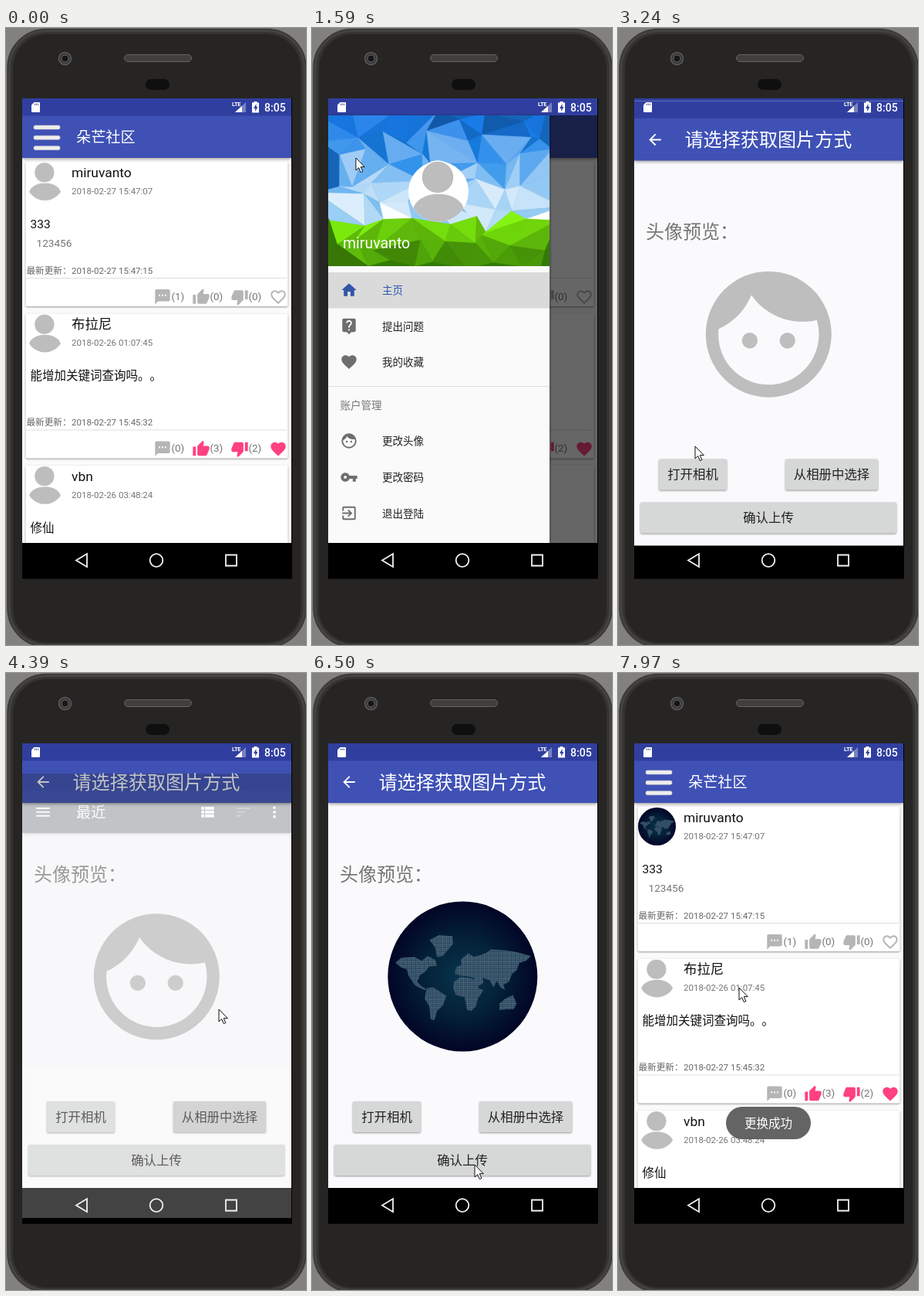
An HTML page for the animation above (8 s loop, 389 by 798 pixels).

```html
<!DOCTYPE html>
<html lang="zh-CN">
<head>
<meta charset="utf-8">
<title>社区</title>
<style>
  html, body { margin: 0; width: 100%; height: 100%; overflow: hidden; background: #83817e }
  svg { display: block; width: 389px; height: 798px; font-family: Roboto, "Noto Sans CJK SC", "Noto Sans CJK", sans-serif }
  text { white-space: pre; text-spacing-trim: space-all; font-feature-settings: "chws" 0, "halt" 0 }
  .card { filter: drop-shadow(0 1px 1px #0006) }
  .bar { filter: drop-shadow(0 1px 2px #0007) }
</style>
</head>
<body>
<svg viewBox="0 0 389 798">
  <defs>
    <path id="home" d="M10 20v-6h4v6h5v-8h3L12 3 2 12h3v8z"/>
    <path id="help" d="M19 2H5c-1.1 0-2 .9-2 2v14c0 1.1.9 2 2 2h4l3 3 3-3h4c1.1 0 2-.9 2-2V4c0-1.1-.9-2-2-2zm-6 16h-2v-2h2v2zm2.07-7.75l-.9.92C13.45 11.9 13 12.5 13 14h-2v-.5c0-1.1.45-2.1 1.17-2.83l1.24-1.26c.37-.36.59-.86.59-1.41 0-1.1-.9-2-2-2s-2 .9-2 2H8c0-2.21 1.79-4 4-4s4 1.79 4 4c0 .88-.36 1.68-.93 2.25z"/>
    <path id="heart" d="M12 21.35l-1.45-1.32C5.4 15.36 2 12.28 2 8.5 2 5.42 4.42 3 7.5 3c1.74 0 3.41.81 4.5 2.09C13.09 3.81 14.76 3 16.5 3 19.58 3 22 5.42 22 8.5c0 3.78-3.4 6.86-8.55 11.54z"/>
    <path id="heartLine" d="M16.5 3c-1.74 0-3.41.81-4.5 2.09C10.91 3.81 9.24 3 7.5 3 4.42 3 2 5.42 2 8.5c0 3.78 3.4 6.86 8.55 11.54L12 21.35l1.45-1.32C18.6 15.36 22 12.28 22 8.5 22 5.42 19.58 3 16.5 3zm-4.4 15.55l-.1.1-.1-.1C7.14 14.24 4 11.39 4 8.5 4 6.5 5.5 5 7.5 5c1.54 0 3.04.99 3.57 2.36h1.87C13.46 5.99 14.96 5 16.5 5c2 0 3.5 1.5 3.5 3.5 0 2.89-3.14 5.74-7.9 10.05z"/>
    <g id="face">
      <circle cx="9" cy="13" r="1.25"/><circle cx="15" cy="13" r="1.25"/>
      <path d="M12 2a10 10 0 1 0 0 20a10 10 0 1 0 0-20zm0 18c-4.41 0-8-3.59-8-8 0-.29.02-.58.05-.86 2.36-1.05 4.23-2.98 5.21-5.37C11.07 8.33 14.05 10 17.42 10c.78 0 1.53-.09 2.25-.26.21.71.33 1.47.33 2.26 0 4.41-3.59 8-8 8z"/>
    </g>
    <path id="key" d="M12.65 10C11.83 7.67 9.61 6 7 6c-3.31 0-6 2.69-6 6s2.69 6 6 6c2.61 0 4.83-1.67 5.65-4H17v4h4v-4h2v-4zM7 14c-1.1 0-2-.9-2-2s.9-2 2-2 2 .9 2 2-.9 2-2 2z"/>
    <path id="exit" d="M10.09 15.59L11.5 17l5-5-5-5-1.41 1.41L12.67 11H3v2h9.67zM19 3H5c-1.11 0-2 .9-2 2v4h2V5h14v14H5v-4H3v4c0 1.1.89 2 2 2h14c1.1 0 2-.9 2-2V5c0-1.1-.9-2-2-2z"/>
    <path id="chat" d="M20 2H4c-1.1 0-1.99.9-1.99 2L2 22l4-4h14c1.1 0 2-.9 2-2V4c0-1.1-.9-2-2-2zM9 11H7V9h2v2zm4 0h-2V9h2v2zm4 0h-2V9h2v2z"/>
    <path id="up" d="M1 21h4V9H1v12zm22-11c0-1.1-.9-2-2-2h-6.31l.95-4.57.03-.32c0-.41-.17-.79-.44-1.06L14.17 1 7.59 7.59C7.22 7.95 7 8.45 7 9v10c0 1.1.9 2 2 2h9c.83 0 1.54-.5 1.84-1.22l3.02-7.05c.09-.23.14-.47.14-.73z"/>
    <use id="down" href="#up" transform="rotate(180 12 12)"/>
    <path id="back" d="M20 11H7.83l5.59-5.59L12 4l-8 8 8 8 1.41-1.41L7.83 13H20z"/>
    <path id="menu" d="M3 18h18v-2H3zm0-5h18v-2H3zm0-7v2h18V6z"/>
    <path id="rows" d="M4 14h4v-4H4zm0 5h4v-4H4zM4 9h4V5H4zm5 5h12v-4H9zm0 5h12v-4H9zM9 5v4h12V5z"/>
    <path id="sort" d="M3 18h6v-2H3zM3 6v2h18V6zm0 7h12v-2H3z"/>
    <g id="more"><circle cx="12" cy="6" r="2"/><circle cx="12" cy="12" r="2"/><circle cx="12" cy="18" r="2"/></g>
    <path id="image" d="M21 19V5c0-1.1-.9-2-2-2H5c-1.1 0-2 .9-2 2v14c0 1.1.9 2 2 2h14c1.1 0 2-.9 2-2zM8.500 13.500l2.500 3.010L14.500 12l4.500 6H5z"/>
    <clipPath id="round"><circle r="39"/></clipPath>
    <g id="person" fill="#bdbdbd">
      <circle r="39" fill="#fff"/>
      <ellipse cy="25" rx="33" ry="22" clip-path="url(#round)"/>
      <circle cx="-1" cy="-18.5" r="21" stroke="#fff" stroke-width="1.5"/>
    </g>
    <radialGradient id="sea"><stop stop-color="#07344c"/><stop offset=".5" stop-color="#042239"/><stop offset="1" stop-color="#020526"/></radialGradient>
    <pattern id="dots" width="2" height="2" patternUnits="userSpaceOnUse"><rect width="2" height="2" fill="#1d3b52"/><circle cx="1" cy="1" r=".7" fill="#6b8495"/></pattern>
    <path id="land" fill="url(#dots)" d="M207 246l6-5 14-1 8 4 6-5 8 4 2 6-8 1-5 6-5 3-3 7 5 5 5 3-2 1-10-5-7-10-2-7-6-2zM243 222l10-5 14 1 1 8-11 13-6 1-2-10zM240 273l7-1 14 9-4 10-6 6-3 10-4-2-1-13-5-8zM269 266l7-5 8 1 8 2 3 9 5 2-6 9-2 8-5 5-4-1-3-14-9-2-3-7zM270 258l1-7 6-3-1-5 8-7 6 4 12-4 6-4 16 1 12 2 14 4-5 5-7 2-3 8-5 4-3 8-6 3 2 6-5-3-4-7-3 7-5-8-7-2 1 5-6 4-4-9-9-2-6-1zM317 289l6-5 8-4 4 9-3 6-8 0-7 1z"/>
    <clipPath id="screen"><rect x="21" y="91" width="349" height="621"/></clipPath>
    <clipPath id="window"><rect x="21" y="91" width="349" height="575"/></clipPath>
    <clipPath id="header"><rect x="21" y="113" width="287" height="195"/></clipPath>
  </defs>

  <rect width="389" height="798" fill="#83817e"/>
  <rect x="2" y="1.500" width="387" height="799" rx="50" fill="#44423f" stroke="#3a3836" stroke-width="1.500"/>
  <rect x="5" y="4.500" width="381" height="793" rx="47" fill="#353330" stroke="#484643"/>
  <rect x="9" y="8" width="373" height="787" rx="44" fill="#262523"/>
  <circle cx="76.500" cy="39.500" r="8" fill="#3a3938" stroke="#5c5b59" stroke-width="1.500"/>
  <circle cx="76.500" cy="39.500" r="4.500" fill="#15161a" stroke="#6b6b6b"/>
  <rect x="153.500" y="34.500" width="87" height="9" rx="4.500" fill="#403f3d" stroke="#656360"/>
  <rect x="181" y="66" width="31" height="14" rx="7" fill="#0f0f10"/>
  <rect x="21" y="91" width="350" height="621.500"/>

  <g clip-path="url(#screen)">
    <g id="list" clip-path="url(#window)"></g>
    <g id="upload"></g>
    <g id="picker"></g>
    <g fill="#fff">
      <path d="M36.500 96H43a1 1 0 0 1 1 1V108a1 1 0 0 1-1 1H34a1 1 0 0 1-1-1V99.500z"/>
      <path d="M37.500 97.500v2.500m2-2.500v2.500m2-2.500v2.500" stroke="#555f9f"/>
      <path d="M311 96V109H297z" opacity=".35"/>
      <path d="M306 100.700V109H297z"/>
      <text x="293" y="101" font-size="7.500" font-weight="700" letter-spacing="-.4">LTE</text>
      <path d="M321.500 95h4v1.500h2.500V109.500h-9V96.500h2.500z"/>
      <path d="M324.500 98l-3.500 6h2.200v4l3.300-6h-2z" fill="#303f9f"/>
      <text x="335" y="107.700" font-size="14" font-weight="500">8:05</text>
    </g>
    <g fill="none" stroke="#f2f2f2" stroke-width="1.800">
      <path d="M91 688.500l14-8.500v17zM285 681.500h14v14h-14z"/><circle cx="195" cy="688.500" r="8.300"/>
    </g>
  </g>
  <path id="cursor" d="M0 0V16l3.700-3.400 2.600 6 2.600-1.100-2.600-5.900H11.300z" fill="#fff" stroke="#111"/>
</svg>
<script>
const $ = id => document.getElementById(id);
const text = (x, y, size, fill, s, more = '') => `<text x="${x}" y="${y}" font-size="${size}" fill="${fill}" ${more}>${s}</text>`;
const rect = (x, y, w, h, fill, more = '') => `<rect x="${x}" y="${y}" width="${w}" height="${h}" fill="${fill}" ${more}/>`;
const icon = (id, x, y, fill, k = .97) => `<use href="#${id}" fill="${fill}" transform="translate(${x} ${y}) scale(${k}) translate(-12 -12)"/>`;
const person = (x, y, r) => `<use href="#person" transform="translate(${x} ${y}) scale(${r / 39})"/>`;
const world = (x, y, r, corner) => `<g transform="translate(${x} ${y}) scale(${r / 79}) translate(-278 -260.5)">
  ${rect(199, 181.5, 158, 158, 'url(#sea)', `rx="${corner}"`)}<use href="#land"/></g>`;
const page = (bg, status, bar) => rect(21, 91, 349, 575, bg) + rect(21, 113, 349, 55, bar, 'class="bar"') + rect(21, 91, 349, 22.5, status);

const GREY = '#757575', PALE = '#b5b5b5', PINK = '#ff4081', USER = 'miruvanto';

function post(i, name, made, title, note, updated, counts, liked) {
  const tint = liked ? PINK : PALE;
  return `<g transform="translate(0 ${i * 196.4})">
    ${rect(25.5, 173, 340, 187, '#fff', 'rx="2.5" class="card"')}${person(50.5, 198.5, 24.5)}
    ${text(85, 193, 17.4, '#111', name)}${text(85, 215, 11.5, GREY, made)}
    ${text(31.5, 259, 15.5, '#111', title)}${text(39.5, 283, 13.6, GREY, note)}
    ${text(26.5, 318, 11.6, '#666', '最新更新：')}${text(85, 318, 11.5, '#666', updated)}
    ${rect(26, 323, 338, 1, '#dedede')}
    ${icon('chat', 203, 347.7, PALE)}${icon('up', 253, 348, tint)}${icon('down', 303, 348, tint)}
    ${icon(liked ? 'heart' : 'heartLine', 353, 348, tint)}
    ${counts.map((n, k) => text(214.5 + 50 * k, 351.5, 13.4, GREY, `(${n})`)).join('')}</g>`;
}

// Low-poly landscape: a jittered grid of triangles, sky paling downwards, hills darkening.
function landscape() {
  let seed = 11, out = '';
  const random = () => (seed = seed * 16807 % 2147483647) / 2147483647;
  const cols = 8, rows = 7, points = [];
  for (let j = 0; j <= rows; j++) for (let i = 0; i <= cols; i++)
    points.push([(i + (random() - .5) * .9) / cols, (j + (random() - .5) * .9) / rows]);
  const triangle = (...corners) => {
    const [u, v] = [0, 1].map(n => (corners[0][n] + corners[1][n] + corners[2][n]) / 3), n = random();
    const color = v < .68 ? `hsl(${202 + (1 - v) * 10} 82% ${34 + v * 62 + n * 26 - u * (.5 - v) * 18}%)`
      : `hsl(${78 + v * 16} 90% ${92 - v * 72 + n * 12}%)`;
    const outline = corners.map(([x, y]) => `${(21 + x * 287).toFixed(1)} ${(113 + y * 195).toFixed(1)}`).join('L');
    out += `<path d="M${outline}z" fill="${color}" stroke="${color}" stroke-width=".6"/>`;
  };
  for (let j = 0; j < rows; j++) for (let i = 0; i < cols; i++) {
    const k = j * (cols + 1) + i, [a, b, c, d] = [k, k + 1, k + cols + 1, k + cols + 2].map(n => points[n]);
    if (random() < .5) { triangle(a, b, c); triangle(b, c, d); } else { triangle(a, b, d); triangle(a, c, d); }
  }
  return `<g clip-path="url(#header)">${rect(21, 113, 287, 98, '#1565b8')}${rect(21, 211, 287, 97, '#357a08')}${out}</g>`;
}

const menuRow = (y, id, label, fill = '#6e6e6e', ink = '#222') => icon(id, 48, y, fill) + text(91, y + 5, 13.5, ink, label);

$('list').innerHTML = page('#fafafa', '#303f9f', '#3f51b5')
  + [126, 139.3, 152.7].map(y => rect(36, y, 34, 5, '#eee', 'rx="2" stroke="#c9c9c9" stroke-width=".6"')).join('')
  + text(91, 148.3, 19.2, '#fff', '朵芒社区')
  + post(0, USER, '2018-02-27 15:47:07', '333', '123456', '2018-02-27 15:47:15', [1, 0, 0])
  + post(1, '布拉尼', '2018-02-26 01:07:45', '能增加关键词查询吗。。', '', '2018-02-27 15:45:32', [0, 3, 2], true)
  + post(2, 'vbn', '2018-02-26 03:48:24', '修仙', '', '', [0, 0, 0])
  + `<g id="newAvatar">${world(50.5, 198.5, 24.5, 79)}</g>`
  + rect(21, 113, 349, 553, '#000', 'id="scrim"')
  + `<g id="drawer">${rect(21, 113, 287, 553, '#fafafa', 'class="bar"')}${landscape()}
    ${person(164, 211.5, 39)}${text(40, 285, 19.5, '#fff', USER)}
    ${rect(21, 316, 287, 46.5, '#dadada')}${menuRow(339, 'home', '主页', '#3355a8', '#2c57b0')}
    ${menuRow(385.5, 'help', '提出问题')}${menuRow(432, 'heart', '我的收藏')}
    ${rect(21, 463, 287, 1, '#dedede')}${text(36.5, 493, 13.5, GREY, '账户管理')}
    ${menuRow(534, 'face', '更改头像')}${menuRow(581, 'key', '更改密码')}${menuRow(627.5, 'exit', '退出登陆')}</g>`
  + `<g id="toast">${rect(140, 561, 110, 42, '#5c5c5c', 'rx="21" opacity=".95"')}${text(195, 587.5, 15.5, '#fff', '更换成功', 'text-anchor="middle"')}</g>`;

const button = (id, x, y, w, label) => rect(x, y, w, 40, '#d6d7d7', `id="${id}" rx="2" class="card"`)
  + text(x + w / 2, y + 26, 16.4, '#222', label, 'text-anchor="middle"');

$('upload').innerHTML = page('#fafafc', '#303f9f', '#3f51b5')
  + icon('back', 48, 141, '#fff') + text(86.5, 149.5, 24.1, '#fff', '请选择获取图片方式')
  + text(36, 269, 24, GREY, '头像预览：')
  + `<g id="blank">${icon('face', 195.3, 392.7, '#bebebe', 8.15)}</g><g id="chosen">${world(195.3, 392.5, 97, 79)}</g>`
  + button('camera', 53, 554, 88, '打开相机') + button('album', 217, 554, 120, '从相册中选择') + button('confirm', 29, 610, 332, '确认上传');

const eye = (x, y) => `<circle cx="${x}" cy="${y}" r="9" fill="#8f6430" stroke="#5b4127"/><circle cx="${x}" cy="${y}" r="5.5" fill="#15110e"/>`;
const cat = `<svg x="34" y="182" width="157.5" height="157" viewBox="34 182 157.5 157">${rect(34, 182, 158, 157, '#bcb3a2')}
  <path d="M34 270L84 339H34z" fill="#957c4c"/><path d="M124 339L192 280V339z" fill="#ddd0b0"/>
  <path d="M64 276L130 290 112 339H76z" fill="#1b2030"/>
  <path d="M130 184Q176 178 190 196V284Q160 306 132 339H114Q118 306 100 286z" fill="#dcd6cf"/>
  <ellipse cx="95" cy="238" rx="62" ry="54" fill="#e9e3dc"/>
  <path d="M38 182H76Q66 202 38 214zM98 182H156Q152 200 134 200Q116 200 98 182z" fill="#d3a35c"/>
  ${eye(68, 222)}${eye(114, 232)}<path d="M80 234l10 2-6 6z" fill="#cf9c90"/><path d="M70 250Q82 240 100 258" fill="none" stroke="#a08a7e" stroke-width="1.5"/></svg>`;
const file = (x, thumb, name, date) => rect(x, 181.5, 157.5, 210, '#fbfbfb', 'class="card"') + thumb
  + icon('image', x + 26.5, 365, '#db4437') + text(x + 48.7, 364, 15.6, '#444', name) + text(x + 48.7, 381, 11.6, '#7a7a7a', date);

$('picker').innerHTML = page('#f6f6f6', '#20282d', '#2a333a')
  + icon('menu', 48, 141, '#fff') + text(91, 148.3, 19.2, '#fff', '最近')
  + icon('rows', 261, 141, '#fff') + icon('sort', 308, 141, '#6b7378') + icon('more', 348, 141, '#fff')
  + `<g id="files">${file(34, cat, 'timg (1).jpg', '上午7:52')}${file(199, world(277.5, 260.5, 78.5, 0), 'timg.jpg', '2月26日')}</g>`;

const LOOP = 8000;
// Spans during which the picture stands still.
const holds = [[0, 70], [900, 1210], [1210, 1360], [2140, 2280], [2770, 3000], [3300, 3470], [4390, 4470], [4470, 4620],
  [5170, 5550], [5630, 5780], [6500, 6800], [7660, 7890], [7970, 8000]];
// Pointer stops: time, x, y.
const stops = [[70, 303, 745], [900, 54, 143], [1400, 54, 143], [2650, 100, 541], [3350, 100, 541], [4050, 272, 575], [4200, 275, 570],
  [4390, 276, 435], [5170, 267, 380], [5850, 267, 380], [6480, 211, 636], [6850, 211, 636], [7640, 213, 489], [7850, 213, 489], [7970, 157, 407]];

const seg = (t, a, b) => Math.min(1, Math.max(0, (t - a) / (b - a)));
const show = (id, alpha) => $(id).setAttribute('opacity', alpha);
const move = (id, x, y) => $(id).setAttribute('transform', `translate(${x} ${y})`);

function pointer(t) {
  const i = Math.max(1, stops.findIndex(s => s[0] >= t));
  const [a, b] = [stops[i - 1], stops[i]], k = seg(t, a[0], b[0]), e = k * k * (3 - 2 * k);
  move('cursor', a[1] + (b[1] - a[1]) * e, a[2] + (b[2] - a[2]) * e);
  show('cursor', t < 70 ? 0 : 1);
}

// A window rises while fading in, later sinks while fading out.
function slide(id, t, opens, closes) {
  const rise = seg(t, opens, opens + 350), sink = seg(t, closes, closes + 250);
  move(id, 0, 50 * (1 - rise) ** 1.5 + 50 * sink * sink);
  show(id, seg(t, opens, opens + 200) * (1 - seg(sink, .4, 1)));
}

function draw(now) {
  let t = now % LOOP;
  const hold = holds.find(([a, b]) => t >= a && t < b);
  if (hold) t = hold[0];

  const open = (1 - (1 - seg(t, 1171, 1471)) ** 2) * (1 - seg(t, 3000, 3250));
  move('drawer', -287 * (1 - open) - (open ? 0 : 10), 0);
  show('scrim', .6 * open ** 1.45);
  slide('upload', t, 2950, 6950);
  slide('picker', t, 4336, 5750);
  show('files', seg(t, 4680, 4800));

  const picked = t >= 5700 ? 1 : 0;
  show('chosen', picked);
  show('blank', 1 - picked);
  show('newAvatar', picked);
  $('album').setAttribute('fill', t > 4200 && t < 4700 ? '#c7c7c7' : '#d6d7d7');
  $('confirm').setAttribute('fill', t > 6800 ? '#c7c7c7' : '#d6d7d7');
  show('toast', seg(t, 7250, 7450));
  pointer(t);
  requestAnimationFrame(draw);
}
requestAnimationFrame(draw);
</script>
</body>
</html>
```
